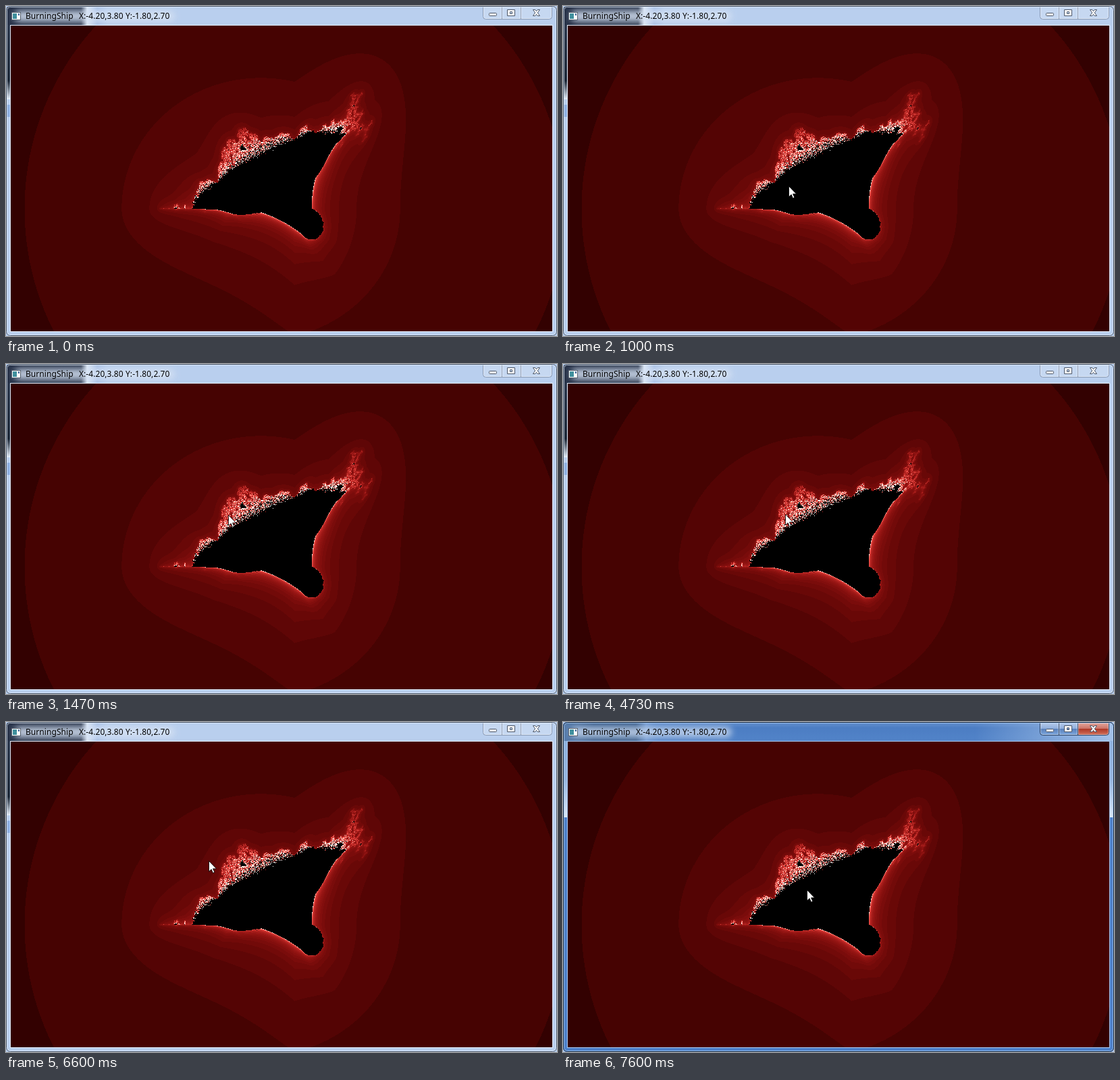
Animation of 816x488 px, one loop 8 s. Source, as an HTML page with a canvas:

```html
<!DOCTYPE html>
<html lang="en">
<head>
<meta charset="utf-8">
<title>BurningShip</title>
<style>
html, body { margin: 0; width: 100%; height: 100%; overflow: hidden; background: #b9cfee; }
#stage { position: relative; width: 816px; height: 488px; overflow: hidden; }
svg, canvas { position: absolute; left: 0; top: 0; display: block; }
canvas { left: 7px; top: 29px; }
text { font: 12px "Noto Sans", "Open Sans", sans-serif; fill: #000; letter-spacing: .06px; }
</style>
</head>
<body>
<div id="stage">
<svg width="816" height="488" viewBox="0 0 816 488">
  <defs>
    <linearGradient id="smudgeIdle">
      <stop offset="0" stop-color="#29344a"/><stop offset=".74" stop-color="#2f3b52"/>
      <stop offset=".8" stop-color="#dde8f8"/><stop offset=".9" stop-color="#a9c1e7"/>
      <stop offset="1" stop-color="#b9cfee"/>
    </linearGradient>
    <linearGradient id="smudgeActive">
      <stop offset="0" stop-color="#5b7fae"/><stop offset=".3" stop-color="#3b5f8c"/>
      <stop offset=".72" stop-color="#3b5f8c"/><stop offset=".82" stop-color="#7099d2"/>
      <stop offset="1" stop-color="#5284c9" stop-opacity="0"/>
    </linearGradient>
    <linearGradient id="sideDark" x2="0" y2="1">
      <stop offset="0" stop-color="#2c384d"/><stop offset=".75" stop-color="#1d2838"/>
      <stop offset="1" stop-color="#e6effb"/>
    </linearGradient>
    <linearGradient id="sideLight" x2="0" y2="1">
      <stop offset="0" stop-color="#8fb1de"/><stop offset=".5" stop-color="#97b6e0"/>
      <stop offset="1" stop-color="#dbe8f8"/>
    </linearGradient>
    <linearGradient id="bar" x2="0" y2="1">
      <stop offset="0" stop-color="#6792cf"/><stop offset=".3" stop-color="#4c7dc3"/>
      <stop offset="1" stop-color="#5284c9"/>
    </linearGradient>
    <linearGradient id="shine">
      <stop offset="0" stop-color="#a3c1e8" stop-opacity="0"/><stop offset="1" stop-color="#a3c1e8"/>
    </linearGradient>
    <linearGradient id="blueBtn" x2="0" y2="1">
      <stop offset="0" stop-color="#b9cdec"/><stop offset=".48" stop-color="#8eaddb"/>
      <stop offset=".5" stop-color="#587fb9"/><stop offset="1" stop-color="#7ba5dc"/>
    </linearGradient>
    <linearGradient id="redBtn" x2="0" y2="1">
      <stop offset="0" stop-color="#e5aaa0"/><stop offset=".48" stop-color="#cb7266"/>
      <stop offset=".5" stop-color="#ad3524"/><stop offset="1" stop-color="#d0705a"/>
    </linearGradient>
    <filter id="soft" x="-20%" y="-60%" width="140%" height="220%"><feGaussianBlur stdDeviation="5"/></filter>
    <clipPath id="win"><rect width="816" height="488" rx="6"/></clipPath>
    <g id="glyphs" stroke="#4b5668" fill="#fff">
      <rect x="715.5" y="10.5" width="11" height="4" rx="1"/>
      <path fill-rule="evenodd" d="M742.5 5.5H753.5V14.5H742.5ZM746.5 8.5H749.5V11.5H746.5Z"/>
      <path d="M780.5 5.5H783.8L785.5 7.8L787.2 5.5H790.5L787.3 10L790.5 14.5H787.2L785.5 12.2L783.8 14.5H780.5L783.7 10Z"/>
    </g>
    <path id="group" d="M706.5 1V15.5Q706.5 19.5 710.5 19.5H804.5Q808.5 19.5 808.5 15.5V1M734.5 1V19M762.5 1V19" fill="none"/>
    <path id="bevel" d="M707.5 1.5H733.5V18.5H710.5Q707.5 18.5 707.5 15.5ZM735.5 1.5H761.5V18.5H735.5ZM763.5 1.5H807.5V15.5Q807.5 18.5 804.5 18.5H763.5Z" fill="none" stroke="#fff" opacity=".4"/>
    <rect id="edge" x=".5" y=".5" width="815" height="487" rx="6" fill="none"/>
    <rect id="rim" x="1.5" y="1.5" width="813" height="485" rx="5" fill="none"/>
    <rect id="inset" x="6.5" y="28.5" width="803" height="453" fill="none"/>
  </defs>

  <g clip-path="url(#win)">
    <g id="idle">
      <rect width="816" height="488" fill="#b9cfee"/>
      <rect x="1" y="1" width="149" height="28" fill="url(#smudgeIdle)"/>
      <rect x="1" y="28" width="7" height="110" fill="url(#sideDark)"/>
      <rect x="1" y="146" width="7" height="18" fill="#8fb0e2"/>
      <rect x="12" y="7" width="238" height="16" rx="8" fill="#d5e1f3" opacity=".85" filter="url(#soft)"/>
      <path d="M707 1H808V16Q808 19 805 19H710Q707 19 707 16Z" fill="#c6d8f1"/>
      <use href="#bevel"/>
      <use href="#group" stroke="#8a9ab4"/>
      <use href="#glyphs"/>
      <use href="#rim" stroke="#e3eefb" opacity=".75"/>
      <use href="#edge" stroke="#465264"/>
      <use href="#inset" stroke="#e3edfa"/>
    </g>
    <g id="active">
      <rect width="816" height="488" fill="#4d80ca"/>
      <rect width="816" height="29" fill="url(#bar)"/>
      <rect x="1" y="1" width="149" height="28" fill="url(#smudgeActive)"/>
      <rect x="610" y="1" width="205" height="28" fill="url(#shine)"/>
      <rect x="1" y="28" width="7" height="113" fill="url(#sideLight)"/>
      <rect x="809" y="28" width="6" height="113" fill="url(#sideLight)"/>
      <rect x="12" y="7" width="238" height="16" rx="8" fill="#c2d3eb" opacity=".85" filter="url(#soft)"/>
      <path d="M707 1H762V19H710Q707 19 707 16Z" fill="url(#blueBtn)"/>
      <path d="M762 1H808V16Q808 19 805 19H762Z" fill="url(#redBtn)"/>
      <use href="#bevel"/>
      <use href="#group" stroke="#2d4467"/>
      <use href="#glyphs"/>
      <use href="#rim" stroke="#a5cbf3" opacity=".8"/>
      <use href="#edge" stroke="#17253a"/>
      <use href="#inset" stroke="#a9c8ef"/>
    </g>
  </g>
  <rect x="8.5" y="9.5" width="13" height="11" fill="#fff" stroke="#56616f"/>
  <rect x="10" y="11" width="6" height="8" fill="#3f8f9c"/>
  <rect x="18" y="11" width="2" height="3" fill="#46699b"/>
  <text x="29" y="19">BurningShip</text>
  <text x="108" y="19">X:-4.20,3.80</text>
  <text x="177" y="19">Y:-1.80,2.70</text>
</svg>
<canvas id="ship" width="802" height="452"></canvas>
<svg width="816" height="488" viewBox="0 0 816 488">
  <path id="cursor" d="M.5 .5V16.2L4.1 12.8L6.5 18.3L8.9 17.3L6.5 11.9H11.5Z" fill="#fff" stroke="#000" stroke-width=".8"/>
</svg>
</div>
<script>
const $ = id => document.getElementById(id);
const LOOP = 8000, TICK = 1000 / 15, LIMIT = 128;

function escapeTime(cx, cy) {
  let x = 0, y = 0;
  for (let n = 0; n < LIMIT; n++) {
    const xx = x * x, yy = y * y;
    if (xx + yy > 16) return n;
    y = 2 * Math.abs(x * y) + cy;
    x = xx - yy + cx;
  }
  return LIMIT;
}

function shade(n) {
  if (n === LIMIT) return [0, 0, 0];
  const pale = 255 * Math.pow(n / 80, 1.25);
  return [51 * Math.pow(n, 0.45), pale, pale * 0.92];
}

function paintShip() {
  const { width, height } = $('ship');
  const g = $('ship').getContext('2d');
  const img = g.createImageData(width, height);
  for (let j = 0, k = 0; j < height; j++) {
    for (let i = 0; i < width; i++, k += 4) {
      const n = escapeTime((i - 420) / 100, (j - 270.5) / 100);
      img.data.set([...shade(n), 255], k);
    }
  }
  g.putImageData(img, 0, 0);
}

// Pointer path: tick, x, y
const path = [
  [5, 757, 84], [8, 590, 180], [11, 430, 240], [15, 334, 266], [17, 294, 281],
  [18, 285, 276], [20, 303, 246], [22, 329, 223], [70, 329, 223], [71, 329, 222],
  [72, 332, 212], [74, 339, 195], [89, 339, 195], [90, 337, 193], [93, 321, 190],
  [97, 298, 200], [99, 300, 205], [108, 300, 205], [111, 334, 228], [114, 361, 248]
];

function pointerAt(tick) {
  const i = path.findIndex(p => p[0] > tick);
  if (i < 0) return path[path.length - 1].slice(1);
  const [t0, x0, y0] = path[i - 1], [t1, x1, y1] = path[i];
  const u = (tick - t0) / (t1 - t0);
  return [Math.round(x0 + (x1 - x0) * u), Math.round(y0 + (y1 - y0) * u)];
}

function show(el, on) { el.setAttribute('visibility', on ? 'visible' : 'hidden'); }

function render(ms) {
  const tick = Math.floor((ms % LOOP + 4) / TICK);
  const focused = tick >= 108 && tick < 120;
  show($('idle'), !focused);
  show($('active'), focused);
  const seen = tick >= path[0][0] && tick < 120;
  show($('cursor'), seen);
  if (seen) $('cursor').setAttribute('transform', `translate(${pointerAt(tick)})`);
}

paintShip();
let start = null;
function loop(now) {
  if (start === null) start = now;
  render(now - start);
  requestAnimationFrame(loop);
}
render(0);
requestAnimationFrame(loop);
</script>
</body>
</html>
```
